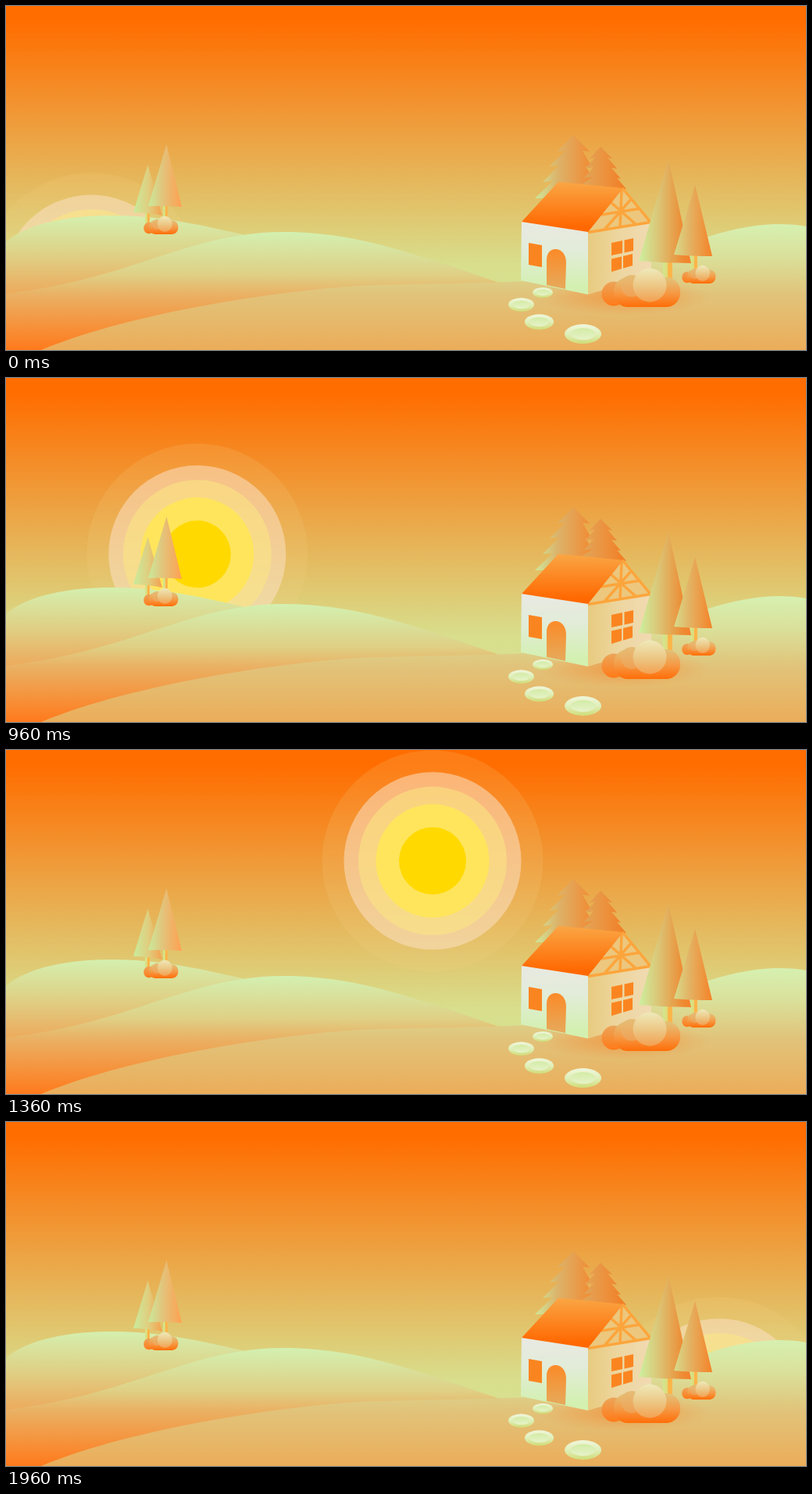
An HTML page that plays this animation: 1024x440 px, repeating every 2 s.

```html
<!DOCTYPE html>
<html lang="en">
<head>
<meta charset="utf-8">
<title>Sunrise over the cottage</title>
<style>
  html, body { margin: 0; width: 100%; height: 100%; overflow: hidden; }
  svg { display: block; width: 100%; height: 100%; }
</style>
</head>
<body>
<svg viewBox="0 0 1024 440">
  <defs id="defs">
    <radialGradient id="shadow">
      <stop offset="0" stop-color="#f97f25" stop-opacity=".6"/>
      <stop offset=".6" stop-color="#f58f3c" stop-opacity=".3"/>
      <stop offset="1" stop-color="#ee9c4c" stop-opacity="0"/>
    </radialGradient>
    <g id="bush">
      <circle cx="16" cy="-17" r="15.5" fill="url(#bushBack)"/>
      <rect x="16" y="-38" width="85" height="38" rx="18" fill="url(#bushBody)"/>
      <circle cx="39" cy="-27" r="14" fill="url(#bushMid)"/>
      <circle cx="62" cy="-28" r="21.5" fill="url(#bushTop)"/>
    </g>
    <g id="stone">
      <ellipse rx="23.5" ry="12.5" fill="url(#stoneRim)"/>
      <ellipse rx="16" ry="7.5" fill="url(#stoneTop)"/>
    </g>
    <path id="sunPath" d="M109 355C316 67 765 70 913 366"/>
  </defs>

  <rect width="1024" height="440" fill="url(#sky)"/>

  <g id="sun">
    <circle r="141.5" fill="#f0cd82" fill-opacity=".17"/>
    <circle r="113.5" fill="#fce1c3" fill-opacity=".55"/>
    <circle r="95" fill="#fce882" fill-opacity=".55"/>
    <circle r="72.5" fill="#ffe55c"/>
    <circle r="43" fill="#ffd900"/>
  </g>

  <!-- Hills -->
  <path fill="url(#hillLeft)" d="M0 302C28 277 83 268 135 268C196 268 250 280 302 292L420 330V440H0Z"/>
  <path fill="url(#hillMiddle)" d="M0 440V368C160 350 235 289 355 289C460 289 545 326 632 354L660 440Z"/>

  <!-- Pines behind the house -->
  <path fill="url(#pineBig)" d="M726 165L747 186L738 185L750 206L742 205L754 225L745 224L760 246H677L700 224L687 225L708 204L696 205L716 185L706 186Z"/>
  <path fill="url(#pineSmall)" d="M761 180L776 195L770 194L782 208L775 207L787 221L782 220L794 234L736 229L750 219L740 220L752 206L741 208L754 194L747 195Z"/>

  <path fill="url(#ground)" d="M45 440C180 384 400 359 470 357C560 355 620 354 670 352C760 350 830 318 890 298C930 284 965 279 990 279Q1010 279 1024 282V440Z"/>
  <ellipse cx="790" cy="372" rx="112" ry="24" fill="url(#shadow)"/>

  <!-- Trees on the left hill -->
  <rect x="178" y="262" width="6" height="20" fill="url(#trunk)"/>
  <rect x="201" y="254" width="6" height="18" fill="url(#trunk)"/>
  <path fill="url(#leftTreeBack)" d="M181.500 203L200 268Q180 264 163 264Z"/>
  <path fill="url(#leftTreeFront)" d="M205.500 177L225 257Q203 255 182 256Z"/>
  <use href="#bush" transform="translate(176 292) scale(.44 .47)"/>

  <!-- House -->
  <path fill="url(#sideWall)" d="M745 289L826 277V345L745 369Z"/>
  <path fill="url(#frontWall)" d="M660 275L745 288V369L659 351Z"/>
  <path fill="#ecc77d" d="M789 233L825 277L745 289Z"/>
  <g fill="none" stroke="#fca53c" stroke-width="3.500">
    <path d="M745 289.500L825 276.500L789 233M788 235L786 283M762 267L812 259M766 286L801 246M807 280L773 250"/>
  </g>
  <path fill="url(#roof)" d="M660 276L707 225L790 233L745 289Z"/>
  <g fill="#fa8520">
    <path d="M669 303L686 306V334L669 331Z"/>
    <path d="M775 303L789 300V316L775 319Z"/>
    <path d="M791.500 299.500L803 297V313L791.500 315.500Z"/>
    <path d="M775 323.500L788 320.500V336L775 340Z"/>
    <path d="M790 320L802 317V332L790 335.500Z"/>
  </g>
  <path fill="url(#door)" d="M692 357V325C692 316 697 310.500 704 311C712 311.500 717 319 717 328L716 362Z"/>

  <!-- Trees beside the house -->
  <rect x="841" y="324" width="12" height="30" fill="url(#trunk)"/>
  <rect x="876" y="316" width="9" height="24" fill="url(#trunk)"/>
  <path fill="url(#rightTreeBack)" d="M848 196L877 329Q843 329 810 326Z"/>
  <path fill="url(#rightTreeFront)" d="M882 229L904 320Q878 320 855 318Z"/>
  <use href="#bush" transform="translate(865 355) scale(.43 .47)"/>
  <use href="#bush" transform="translate(762 385)"/>

  <!-- Stepping stones -->
  <use href="#stone" transform="translate(687 366.500) scale(.55 .53)"/>
  <use href="#stone" transform="translate(659.500 382) scale(.7)"/>
  <use href="#stone" transform="translate(682.500 404) scale(.79)"/>
  <use href="#stone" transform="translate(738.500 419.500)"/>
</svg>
<script>
const DURATION = 2000, STEP = 40;
const $ = id => document.getElementById(id);

function addGradient(id, [x2, y2], stops) {
  const marks = stops.split(", ").map(stop => {
    const [color, offset] = stop.split(" ");
    return `<stop offset="${offset}" stop-color="${color}"/>`;
  }).join("");
  $("defs").insertAdjacentHTML("beforeend",
    `<linearGradient id="${id}" x2="${x2}" y2="${y2}">${marks}</linearGradient>`);
}

const down = {
  sky: "#ff6d00 .045, #d8de8c .75, #d6e494 1",
  hillLeft: "#d5efae 0, #ded287 .28, #eab164 .53, #ff7a1c 1",
  hillMiddle: "#d3f0b0 0, #dfd085 .36, #eab164 .53, #ff7a1c 1",
  ground: "#d6f0b0 0, #dae09a .26, #e1c37a .56, #ebad5a 1",
  frontWall: "#e9e9e2 0, #e2ecd9 .4, #d3f0b0 .9",
  roof: "#faa645 0, #ff6800 .9",
  door: "#fb8a28 0, #e6aa5c 1",
  bushBack: "#eca559 0, #ff7a18 1",
  bushBody: "#e2c27a 0, #f59c48 .5, #ff6e08 1",
  bushMid: "#e5bd76 0, #f0a154 1",
  bushTop: "#efe9ba 0, #ecc582 .55, #f4a152 1",
  stoneRim: "#f0f6dc 0, #e0efb9 .5, #d0dc78 1",
  stoneTop: "#d3eba6 0, #e6f3c8 1",
};
const across = {
  pineBig: "#cde89b 0, #dcb36a .35, #ee903b .8, #f58328 1",
  pineSmall: "#e0a75a 0, #eb9340 .5, #f37c22 1",
  sideWall: "#e8cb80 0, #edd6a0 .5, #f1dab2 1",
  leftTreeBack: "#c8ec9c 0, #dfcf80 .5, #f5a14e 1",
  leftTreeFront: "#c9ea9c 0, #e3c27a .45, #ffa050 1",
  rightTreeBack: "#cdf0a0 0, #dcc273 .4, #ee8a32 .85, #f4812a 1",
  rightTreeFront: "#d6dc8c 0, #e3b364 .4, #f58228 1",
  trunk: "#cfe88e 0, #e2d878 .5, #fdb144 .55, #fbb850 1",
};
for (const id in down) addGradient(id, [0, 1], down[id]);
for (const id in across) addGradient(id, [1, 0], across[id]);

// Cubic Bezier timing with control points (.78, 0) and (.667, 1)
const bezier = (a, b, s) => 3 * (1 - s) ** 2 * s * a + 3 * (1 - s) * s * s * b + s ** 3;
function ease(time) {
  let low = 0, high = 1;
  for (let i = 0; i < 24; i++) {
    const mid = (low + high) / 2;
    if (bezier(.78, .667, mid) < time) low = mid; else high = mid;
  }
  return bezier(0, 1, low);
}

const sun = $("sun"), sunPath = $("sunPath"), pathLength = sunPath.getTotalLength();
function draw() {
  const time = Math.floor(performance.now() % DURATION / STEP) * STEP;
  const { x, y } = sunPath.getPointAtLength(ease(time / DURATION) * pathLength);
  sun.setAttribute("transform", `translate(${x} ${y})`);
  requestAnimationFrame(draw);
}
draw();
</script>
</body>
</html>
```
